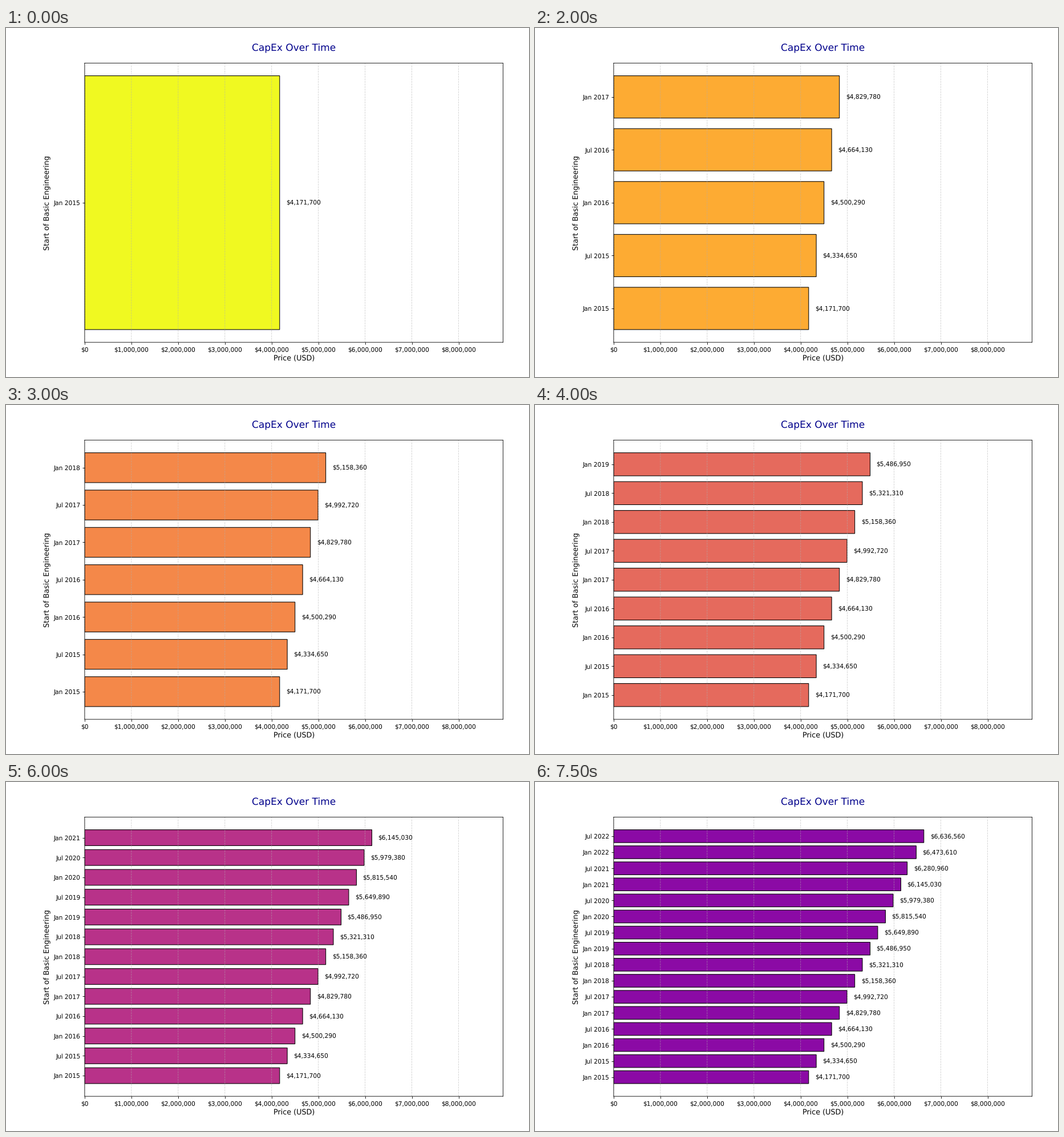
Recreate the animation shown at these times as a matplotlib script. Size 917 by 611 pixels, loop 8 s.

```python
import matplotlib.pyplot as plt
import numpy as np
from matplotlib.animation import FuncAnimation
from matplotlib.ticker import MultipleLocator, StrMethodFormatter

plt.rcParams.update({"font.family": "DejaVu Sans", "text.hinting": "none",
                     "path.snap": False})

FRAMES = 16
BASE_PRICE = 4_171_702
DAILY_RISE = 900.239

# Half-yearly starts from 2015 to 2025, priced by the days elapsed
starts = np.datetime64("2015-01") + 6 * np.arange(21)
labels = [f"{('Jan', 'Jul')[i % 2]} {2015 + i // 2}" for i in range(len(starts))]
starts[labels.index("Jul 2021")] -= 1  # this price dates from a month earlier
days = (starts.astype("datetime64[D]") - np.datetime64("2015-01-01")).astype(int)
prices = np.round((BASE_PRICE + DAILY_RISE * days) / 10).astype(int) * 10

x_max = 1.2 * prices[-1]
label_gap = 0.015 * x_max

fig, ax = plt.subplots(figsize=(12.007, 8), dpi=76.375)
fig.subplots_adjust(left=0.1504, right=0.9504, bottom=0.0995, top=0.8995)


def draw(step):
    ax.clear()
    count = step + 1
    color = plt.cm.plasma(1 - step / len(starts))
    ax.barh(labels[:count], prices[:count], color=color, edgecolor="black")
    for row, price in enumerate(prices[:count]):
        ax.text(price + label_gap, row, f"${price:,}", va="center", fontsize=10)

    ax.set_xlim(0, x_max)
    ax.xaxis.set_major_locator(MultipleLocator(1_000_000))
    ax.xaxis.set_major_formatter(StrMethodFormatter("${x:,.0f}"))
    ax.grid(axis="x", linestyle="--", alpha=0.6)
    ax.set_title("CapEx Over Time", fontsize=16, color="darkblue", pad=20)
    ax.set_xlabel("Price (USD)", fontsize=12)
    ax.set_ylabel("Start of Basic Engineering", fontsize=12)
    return ax.patches


anim = FuncAnimation(fig, draw, frames=FRAMES, interval=500,
                     repeat=True, repeat_delay=0, blit=False)
plt.show()
```
